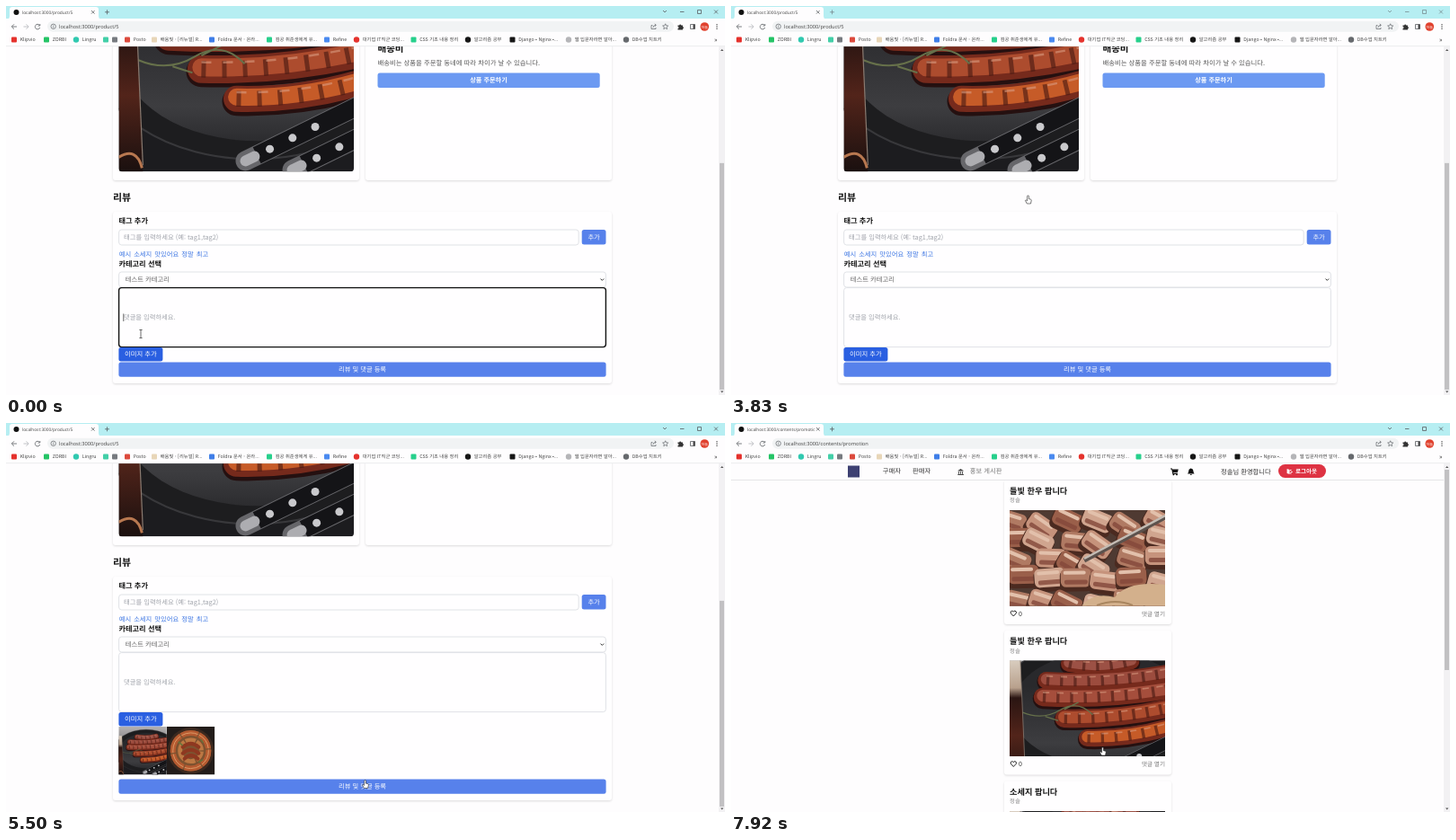
These frames come from a looping animation (800x433 px, 8000 ms). An HTML page:

```html
<!DOCTYPE html>
<html lang="ko">
<head>
<meta charset="utf-8">
<title>Review form</title>
<style>
html, body { margin: 0; height: 100%; overflow: hidden; background: #fefdfe; }
svg { display: block; width: 800px; height: 433px; text-rendering: geometricPrecision; }
text { font-family: 'Noto Sans CJK KR', 'Noto Sans CJK JP', 'Noto Sans', sans-serif; white-space: pre; }
.ui { font-family: 'Open Sans', 'Noto Sans', sans-serif; }
.card { fill: #fffeff; filter: drop-shadow(0 1px 1px #0002); }
.field { fill: #fffeff; stroke: #d8dbe0; stroke-width: .8; }
.line { fill: none; stroke: #5a5d61; stroke-width: .8; }
</style>
</head>
<body>
<svg id="stage" viewBox="0 0 800 433"></svg>
<script>
const LOOP = 8000;
const BLUE = '#5781eb', DEEP_BLUE = '#2a5fe1';

const text = (x, y, label, size = 7.3, fill = '#333', extra = '') =>
  `<text x="${x}" y="${y}" font-size="${size}" fill="${fill}" ${extra}>${label}</text>`;
const bold = (x, y, label, size, fill = '#111', extra = '') =>
  text(x, y, label, size, fill, `font-weight="700" ${extra}`);
const rect = (x, y, w, h, fill, rx = 0, extra = '') =>
  `<rect x="${x}" y="${y}" width="${w}" height="${h}" fill="${fill}" rx="${rx}" ${extra}/>`;
const box = (x, y, w, h, kind, extra = '') =>
  `<rect x="${x}" y="${y}" width="${w}" height="${h}" rx="3" class="${kind}" ${extra}/>`;
const dot = (x, y, r, fill) => `<circle cx="${x}" cy="${y}" r="${r}" fill="${fill}"/>`;
const path = (d, extra = 'class="line"') => `<path d="${d}" ${extra}/>`;
const stroke = (d, color, width, extra = '') =>
  path(d, `fill="none" stroke="${color}" stroke-width="${width}" ${extra}`);
const button = (x, y, w, h, fill, label) =>
  rect(x, y, w, h, fill, 2.5) +
  text(x + w / 2, y + h / 2 + 2.7, label, 7.3, '#fff', 'text-anchor="middle"');
const photo = (id, x, y, w, h = w) => `<use href="#${id}" x="${x}" y="${y}" width="${w}" height="${h}"/>`;

// Photographs, as a few simple shapes
function sausage(x1, y1, x2, y2, width, color) {
  const curve = dy => `M${x1} ${y1 + dy}Q${(x1 + x2) / 2} ${(y1 + y2) / 2 + 12 + dy} ${x2} ${y2 + dy}`;
  return stroke(curve(3), '#251010', width + 3, 'stroke-linecap="round"') +
    stroke(curve(0), '#762a1c', width, 'stroke-linecap="round"') +
    stroke(curve(-2), color, width * .65, 'stroke-linecap="round"') +
    stroke(curve(0), '#451812', width * .6, 'stroke-dasharray="5 18" opacity=".6"') +
    stroke(curve(-width * .25), '#d99b80', 2.5, 'stroke-dasharray="11 13" opacity=".6"');
}

function handle(x, y) {
  const along = d => [x + d * .9, y - d * .44];
  const seg = (a, b) => `M${along(a)}L${along(b)}`;
  return stroke(seg(0, 160), '#66666a', 22, 'stroke-linecap="round"') +
    stroke(seg(14, 165), '#141417', 20) +
    stroke(seg(0, 11), '#adadb1', 12, 'stroke-linecap="round"') +
    [30, 58, 86].map(d => dot(...along(d), 4.5, '#c9c9cc')).join('');
}

const sausagePhoto = `<symbol id="sausages" viewBox="0 0 262 262">
  ${rect(0, 0, 262, 262, 'url(#table)')}
  <ellipse cx="150" cy="132" rx="176" ry="116" fill="#1d1d1f" stroke="#38383b" stroke-width="2"/>
  <ellipse cx="155" cy="132" rx="152" ry="96" fill="url(#plate)"/>
  ${sausage(100, 56, 205, 52, 27, '#9c5145')}${sausage(62, 84, 265, 72, 29, '#9c4c3e')}
  ${sausage(56, 112, 272, 99, 31, '#a54e3c')}${sausage(92, 148, 275, 129, 31, '#ad4c2e')}
  ${sausage(131, 181, 275, 161, 29, '#c65b28')}
  ${stroke('M22 138Q55 152 85 134T140 142M60 145l22 7M92 133l24-12', '#66704a', 2)}
  ${handle(141, 250)}${handle(193, 260)}
  ${path('M0 50H18L27 262H0Z', 'fill="url(#beer)"')}
  ${stroke('M18 50L27 255', '#8a7a70', 1.2)}
  ${stroke('M0 246Q20 234 26 258', '#b87850', 3)}
</symbol>`;

const ring = (r, color, width) => stroke(
  `M${27 - r} 27a${r} ${r} 0 1 1 ${2 * r} 0a${r} ${r} 0 1 1 ${-2 * r} 0`, color, width,
  `stroke-dasharray="${r * .95} 1.4"`);
const panPhoto = `<symbol id="pan" viewBox="0 0 54 54">
  ${rect(0, 0, 54, 54, '#221c1a')}${dot(27, 27, 26, '#3c291f')}${dot(27, 27, 23, '#7d5230')}
  ${ring(20, '#b55a30', 6)}${ring(12, '#bd7843', 5)}${ring(20, '#dd9a68', 1)}
  ${stroke('M18 23Q27 15 36 23M18 30Q27 22 36 30M20 36Q27 29 35 36', '#8e3820', 4, 'stroke-linecap="round"')}
  ${stroke('M13 17l5 4M36 40l5-3M38 14l3 4', '#65733a', 1.5)}
</symbol>`;

const noise = n => { const v = Math.sin(n * 91.7) * 4375.5; return v - Math.floor(v); };
function meatPieces() {
  let pieces = '';
  for (let i = 0; i < 30; i++) {
    const x = (i % 6) * 32 - 12 + noise(i) * 10, y = Math.floor(i / 6) * 23 - 8 + noise(i + 50) * 8;
    const tone = ['#b07a63', '#c6937c', '#9a5f4a', '#d0a58f'][i % 4];
    pieces += `<g transform="translate(${x} ${y}) rotate(${noise(i + 9) * 40 - 5})">` +
      rect(-1, 2, 36, 24, '#4b2a20', 6) + rect(0, 0, 34, 21, tone, 6) +
      rect(3, 3, 25, 4, '#e2c0ab', 2) + rect(4, 13, 26, 5, '#84483a', 2, 'opacity=".8"') + '</g>';
  }
  return pieces;
}
const meatPhoto = `<symbol id="meat" viewBox="0 0 173 107">
  ${rect(0, 0, 173, 107, '#4f3a32')}${meatPieces()}
  ${path('M80 107Q92 91 117 97Q132 78 173 83V107Z', 'fill="#d3b08c"')}
  ${stroke('M97 106Q118 98 137 106', '#a98660', 2)}
  ${stroke('M83 56L173 8', '#5c524d', 5)}${stroke('M83 54L173 6', '#c4bcb4', 2.5)}
</symbol>`;

const gradient = (id, ...stops) => `<linearGradient id="${id}" x2="0" y2="1">` +
  stops.map(([at, color]) => `<stop offset="${at}" stop-color="${color}"/>`).join('') + '</linearGradient>';
const defs = `<defs>
  ${gradient('table', [0, '#b4b1b1'], [.4, '#77767a'], [.8, '#1c1c1f'])}
  ${gradient('plate', [.3, '#29292c'], [.8, '#3d3d40'], [1, '#2c2c2f'])}
  ${gradient('beer', [0, '#d9cdbf'], [.22, '#b8a08c'], [.3, '#2a1512'], [.6, '#52241a'], [1, '#1a100f'])}
  <clipPath id="hero"><rect x="125.5" y="-78" width="261.5" height="262.5" rx="4"/></clipPath>
  <clipPath id="tab"><rect x="17" y="0" width="76" height="14"/></clipPath>
  ${sausagePhoto}${panPhoto}${meatPhoto}</defs>`;

// Product page with the review form
const product = `<g id="product">
  ${box(119, -90, 274, 284, 'card')}${box(400, -90, 274, 284, 'card')}
  <g clip-path="url(#hero)">${photo('sausages', 125.3, -78, 262.4)}</g>
  ${bold(413.5, 51.2, '배송비', 10.5)}
  ${text(413.5, 65.6, '배송비는 상품을 주문할 동네에 따라 차이가 날 수 있습니다.', 7.35, '#555')}
  ${rect(413.5, 74.5, 247.2, 16.4, '#6b99f2', 2.5)}
  ${bold(537, 85.4, '상품 주문하기', 7.2, '#fff', 'text-anchor="middle"')}
  ${bold(119, 217.3, '리뷰', 10.9)}
  ${box(119, 229, 555, 191, 'card', 'id="review"')}
  ${bold(125.5, 242.4, '태그 추가', 8.2)}
  ${box(125.6, 249, 511.6, 17, 'field')}
  ${text(131, 260.2, '태그를 입력하세요 (예: tag1,tag2)', 7.3, '#a0a4ab')}
  ${button(640.7, 249, 26.8, 16.5, BLUE, '추가')}
  ${text(125.7, 278.8, '예시 소세지 맛있어요 정말 최고', 7.3, '#3a74e2', 'word-spacing="1"')}
  ${bold(125.5, 290.2, '카테고리 선택', 8.2)}
  ${box(125.6, 296, 541.8, 17, 'field')}
  ${text(132.8, 307.3, '테스트 카테고리', 7.3, '#666')}
  ${stroke('M661.5 303.6l1.8 1.8 1.8-1.8', '#333', 1)}
  ${box(125.6, 313.6, 541.8, 66, 'field', 'id="comment"')}
  ${text(131, 349.2, '댓글을 입력하세요.', 7.25, '#a0a4ab')}
  ${rect(130.5, 342.5, .7, 8.5, '#222', 0, 'id="caret"')}
  ${button(125.4, 380, 49, 15.5, DEEP_BLUE, '이미지 추가')}
  <g id="uploads">${photo('sausages', 125.3, 396, 53.5)}${photo('pan', 178.8, 396, 53.5)}</g>
  <g id="submit">${button(125.4, 396.4, 542.2, 16.4, BLUE, '리뷰 및 댓글 등록')}</g>
</g>`;

// Promotion board
const post = (y, title, picture) => `${box(304, y, 186, 160.5, 'card')}
  ${bold(310, y + 15.4, title, 9.2)}${text(310, y + 24.8, '정솔', 6.4, '#888')}
  <svg x="310" y="${y + 33.5}" width="173" height="106.5">${picture}</svg>
  ${stroke(`M314.3 ${y + 151.5}l-3-3.2q-.7-2.4 1.4-2.7 1.1 0 1.6 1.1.5-1.1 1.6-1.1 2.1.3 1.4 2.7Z`, '#111', .9)}
  ${text(320, y + 151.2, '0', 7, '#333')}
  ${text(483, y + 151, '댓글 열기', 6.6, '#777', 'text-anchor="end"')}`;

const sausageCrop = photo('sausages', 0, -33.5, 173);
const promo = `<g id="promo">
  ${post(63.5, '들빛 한우 팝니다', photo('meat', 0, 0, 173, 107))}
  ${post(231, '들빛 한우 팝니다', sausageCrop)}
  ${post(398.5, '소세지 팝니다', sausageCrop)}
  ${rect(0, 45, 793, 18.5, '#fefdfe')}${rect(0, 63, 793, .7, '#dcdcdf')}
  ${rect(130, 47.5, 13, 13, '#3d4072')}
  ${text(168.8, 56.4, '구매자')}${text(202, 56.4, '판매자')}
  ${path('M252.5 53l3-2 3.2 2v.6h-6.2ZM253 54.2h1v2.5h-1Zm2 0h1v2.5h-1Zm2 0h1v2.5h-1ZM252.3 57h6.6v1h-6.6Z', 'fill="#444"')}
  ${text(265.8, 56.4, '홍보 게시판', 7.3, '#777')}
  ${path('M489 50.5h1.8l.4 1h6.6l-1 3.8h-4.8l.2.8h4.6v.8h-5.4l-1.2-5.4H489Z', 'fill="#111"')}
  ${dot(492.4, 57.4, .9, '#111')}${dot(496, 57.4, .9, '#111')}
  ${path('M508 56.5q1.2-1.2 1.2-3.2 0-2.2 2.3-2.6v-.5h.6v.5q2.3.4 2.3 2.6 0 2 1.2 3.2ZM510.8 57h2a1 1 0 0 1-2 0Z', 'fill="#111"')}
  ${text(545, 56.5, '정솔님 환영합니다')}
  ${rect(609, 46, 53, 15, '#de3343', 7.5)}
  ${path('M618.6 51l3 1v5l-3-1ZM622 52h1.6v1H622Zm0 3.5h1.6v1H622Zm.8-1.5h2v.9h-2Z', 'fill="#fff"')}
  ${bold(628, 56, '로그아웃', 6.5, '#fff')}
</g>`;

// Browser frame
const bookmarks = [
  [9, '#e5322d', 'Klipvio'], [45, '#25c466', 'ZORBI'], [78, '#31c9b0', 'Lingru'], [111, '#43cfa8', ''],
  [121, '#777b80', ''], [135, '#dc4a3d', 'Posto'], [165, '#e8d6b8', '배움빛 - [리뉴얼] R...'],
  [229, '#3f7ee8', 'Foldra 문서 - 온라...'], [293, '#27d08c', '컴공 취준생에게 유...'], [357, '#4a8af0', 'Refine'],
  [390, '#e5322d', '대기업 IT직군 코딩...'], [453.5, '#27d08c', 'CSS 기초 내용 정리'], [514, '#161616', '알고리즘 공부'],
  [563.5, '#161616', 'Django • Nginx •...'], [626, '#b5b5b8', '웹 입문자라면 알아...'], [690, '#66696d', 'DB수업 치트키']
];
const chrome = `
  ${rect(0, 0, 800, 15, '#b6eef2')}
  ${path('M1 14.5Q4 14.5 4 11V4Q4 1 7 1H100Q103 1 103 4V11Q103 14.5 106 14.5Z', 'fill="#fefdfe"')}
  ${rect(0, 14, 800, 31, '#fefdfe')}${rect(0, 44.5, 800, .6, '#dfe1e4')}
  ${dot(11.5, 7, 3, '#111')}
  <g clip-path="url(#tab)">${text(18, 9, '', 4.8, '#444', 'id="tabTitle" class="ui"')}</g>
  ${path('M95 5l3.6 3.6M98.6 5L95 8.6')}
  <g id="windowControls">${path('M112.5 4.3v5M110 6.8h5M731 5l2 2 2-2M750 6.5h4.5M769.5 4.5h4v4h-4ZM788 4.5l4 4M792 4.5l-4 4')}</g>
  ${path('M12 23H6.5M9 20.3L6.3 23 9 25.7M37.2 21.2A2.8 2.8 0 1 0 37.8 24M37.8 20v2h-2.2')}
  ${stroke('M19.5 23H25M22.5 20.3L25.2 23 22.5 25.7', '#b9bcc0', .9)}
  ${rect(46, 16.8, 697, 12, '#f1f3f4', 6)}
  ${stroke('M50 22.8a2.7 2.7 0 1 1 5.4 0a2.7 2.7 0 1 1-5.4 0M52.7 22.4v2M52.7 21v.7', '#5f6368', .7)}
  ${text(59, 24.9, '', 5.7, '#444', 'id="address" class="ui"')}
  ${stroke('M719.5 21.5h-1.5v4h5v-1.5M720 24q0-2.5 3-2.7M721.8 19.8l1.6 1.5-1.6 1.5M733.7 19.8l.9 2 2.2.2-1.7 1.5.5 2.2-1.9-1.2-1.9 1.2.5-2.2-1.7-1.5 2.2-.2Z', '#5f6368', .7)}
  ${path('M747.5 21.5h1.7a1 1 0 0 1 2 0h1.8v1.7a1 1 0 0 1 0 2v1.3h-5.5v-1.5a1 1 0 0 0 0-2Z', 'fill="#333"')}
  ${path('M761.5 20.5h5v5h-5Z')}${rect(764.5, 20.5, 2, 5, '#444')}
  ${dot(777.3, 23, 4.8, '#e0402c')}${text(777.3, 24.5, '하늘', 4, '#fff', 'text-anchor="middle"')}
  ${[20.7, 23, 25.3].map(y => dot(791, y, .7, '#444')).join('')}
  ${bookmarks.map(([x, color, label]) => (x % 2 ? rect(x - 3, 34.5, 6, 6, color, 1) : dot(x, 37.5, 3.2, color)) +
    text(x + 6.7, 39.4, label, 5.3, '#444')).join('')}
  ${text(788, 39.5, '»', 7, '#333')}
  ${rect(793, 45, 7, 388, '#f2f1f3')}
  ${rect(794, 52, 5, 100, '#c2c1c3', 0, 'id="thumb"')}
  ${path('M795 50l1.7-2 1.7 2ZM795 428.5l1.7 2 1.7-2Z', 'fill="#555"')}`;

const outlined = 'fill="#fff" stroke="#222" stroke-width=".6" stroke-linejoin="round"';
const cursors = `<g id="pointer">
  ${path('M0 0V8L2 6.3 3.3 9 4.6 8.4 3.4 5.8H5.8Z', `id="arrow" ${outlined}`)}
  ${path('M-.9 .9a.9 .9 0 0 1 1.8 0V3.700l2.100.5q.9.3.7 1.300L3 9H-1.200L-3 5.700q.1-1.100 1.100-.6L-.9 5.900Z', `id="hand" ${outlined}`)}
  ${path('M-1.6-4.5H1.6M0-4.5V4.5M-1.6 4.5H1.6', 'id="beam" fill="none" stroke="#444" stroke-width=".8"')}
</g>`;

document.getElementById('stage').innerHTML = defs + rect(0, 0, 800, 433, '#fefdfe') + product + promo + chrome + cursors;
const el = id => document.getElementById(id);
const submitFace = el('submit').querySelector('rect');

// time, x, y, pointer shape from then on
const route = [
  [0, 150, 365, 'beam'], [80, 150, 365, 'beam'], [500, 152, 384, 'hand'], [1000, 152, 386, 'hand'],
  [1150, 151, 370, 'arrow'], [1750, 139, 75, 'arrow'], [1920, 139, 75, 'arrow'], [2080, 137, 80, 'arrow'],
  [2340, 137, 80, 'arrow'], [2420, 201, 124, 'arrow'], [2500, 152, 76, 'arrow'], [2700, 152, 76, 'arrow'],
  [2920, 127, 93, 'arrow'], [3080, 130, 95, 'arrow'], [3670, 330.5, 211, 'hand'], [3920, 330.5, 211, 'arrow'],
  [4050, 345, 224, 'arrow'], [4250, 400, 270.5, 'beam'], [4920, 400.5, 270.5, 'beam'], [5250, 400, 330, 'arrow'],
  [5480, 399.5, 397, 'hand'], [5580, 400.5, 401, 'hand'], [7250, 401, 401, 'hand'], [7800, 413.5, 361, 'hand'],
  [LOOP, 413.5, 361, 'hand']
];
const ease = (t, from, to) => {
  const p = Math.min(1, Math.max(0, (t - from) / (to - from)));
  return p * p * (3 - 2 * p);
};
const show = (id, on) => { el(id).style.display = on ? '' : 'none'; };

function render(t) {
  const onBoard = t >= 7250, uploaded = t >= 3920 && t < 6250, focused = t < 580;
  const growth = uploaded ? 58 : 0;
  const scroll = growth * ease(t, 4000, 4330);

  show('product', !onBoard);
  show('promo', onBoard);
  show('uploads', uploaded);
  show('caret', focused);
  el('product').setAttribute('transform', `translate(0 ${-scroll})`);
  el('submit').setAttribute('transform', `translate(0 ${growth})`);
  el('review').setAttribute('height', 191 + growth);
  el('comment').style.cssText = focused ? 'stroke:#111;stroke-width:1.4' : '';
  submitFace.setAttribute('fill', t >= 5580 ? DEEP_BLUE : BLUE);
  el('windowControls').setAttribute('opacity', t > 700 && t < 3920 ? .65 : 1);

  const trackScale = 375 / (577 + growth);
  el('thumb').setAttribute('y', onBoard ? 52 : 52 + (189 + scroll) * trackScale);
  el('thumb').setAttribute('height', onBoard ? 223 : 388 * trackScale);
  const url = 'localhost:3000/' + (onBoard ? 'contents/promotion' : 'product/5');
  el('tabTitle').textContent = el('address').textContent = url;

  const i = route.findIndex(key => key[0] > t) - 1;
  const [t0, x0, y0, shape] = route[i], [t1, x1, y1] = route[i + 1];
  const p = ease(t, t0, t1);
  el('pointer').setAttribute('transform', `translate(${x0 + (x1 - x0) * p} ${y0 + (y1 - y0) * p})`);
  for (const id of ['arrow', 'hand', 'beam']) show(id, id === shape);
}

const start = performance.now();
function frame() {
  render((performance.now() - start) % LOOP);
  requestAnimationFrame(frame);
}
frame();
</script>
</body>
</html>
```
